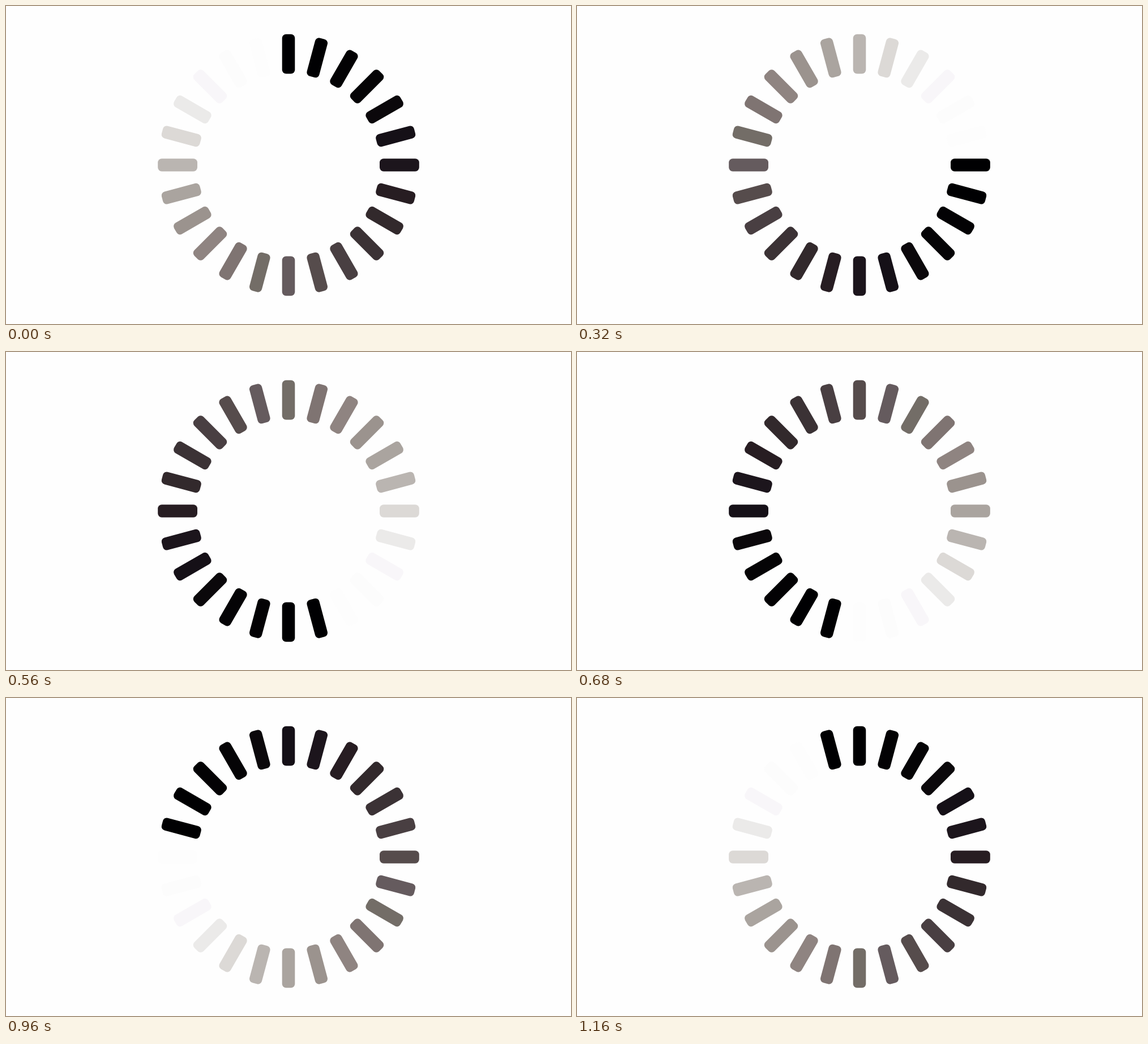
These frames come from a looping animation (998 by 561 pixels, 1200 ms). An HTML page:

```html
<!DOCTYPE html>
<html lang="en">
<head>
<meta charset="utf-8">
<title>Loading spinner</title>
<style>
  html, body { margin: 0; width: 100%; height: 100%; overflow: hidden; background: #fefefe; }
  svg { display: block; width: 998px; height: 561px; }
</style>
</head>
<body>
<svg viewBox="0 0 998 561"><g id="ring" transform="translate(499 280.5)"></g></svg>
<script>
  const LOOP = 1200, SLOT = 40;
  // Tail colours, clockwise from the darkest bar
  const SHADES = (
    "000002 000002 030204 050406 0b080b 151017 1c151c 271d22 " +
    "32292c 3b3235 493f42 564c4c 655b5e 736d67 7f7472 8f8481 " +
    "9b938e aaa49f bab5b1 dcd9d6 ebeae9 f8f6f9 fcfcfc fdfdfd"
  ).split(" ").map(hex => "#" + hex);
  const COUNT = SHADES.length;

  function makeBar(i) {
    const bar = document.createElementNS("http://www.w3.org/2000/svg", "rect");
    const attrs = {
      x: -11.3, y: -230.8, width: 22.6, height: 69.8, rx: 7,
      transform: `rotate(${i * 360 / COUNT})`
    };
    for (const name in attrs) bar.setAttribute(name, attrs[name]);
    return document.getElementById("ring").appendChild(bar);
  }

  const bars = Array.from({ length: COUNT }, (_, i) => makeBar(i));

  // 24 steps of 50 ms, each shown from the next 40 ms slot
  function stepAt(time) {
    const slot = Math.floor((time % LOOP) / SLOT);
    return Math.floor(slot * COUNT * SLOT / LOOP + 1e-6);
  }

  let shown = -1;
  function draw(time) {
    const step = stepAt(time);
    if (step === shown) return;
    shown = step;
    bars.forEach((bar, i) => bar.setAttribute("fill", SHADES[(i - step + COUNT) % COUNT]));
  }

  const start = performance.now();
  function tick() {
    draw(performance.now() - start);
    requestAnimationFrame(tick);
  }
  tick();
</script>
</body>
</html>
```
